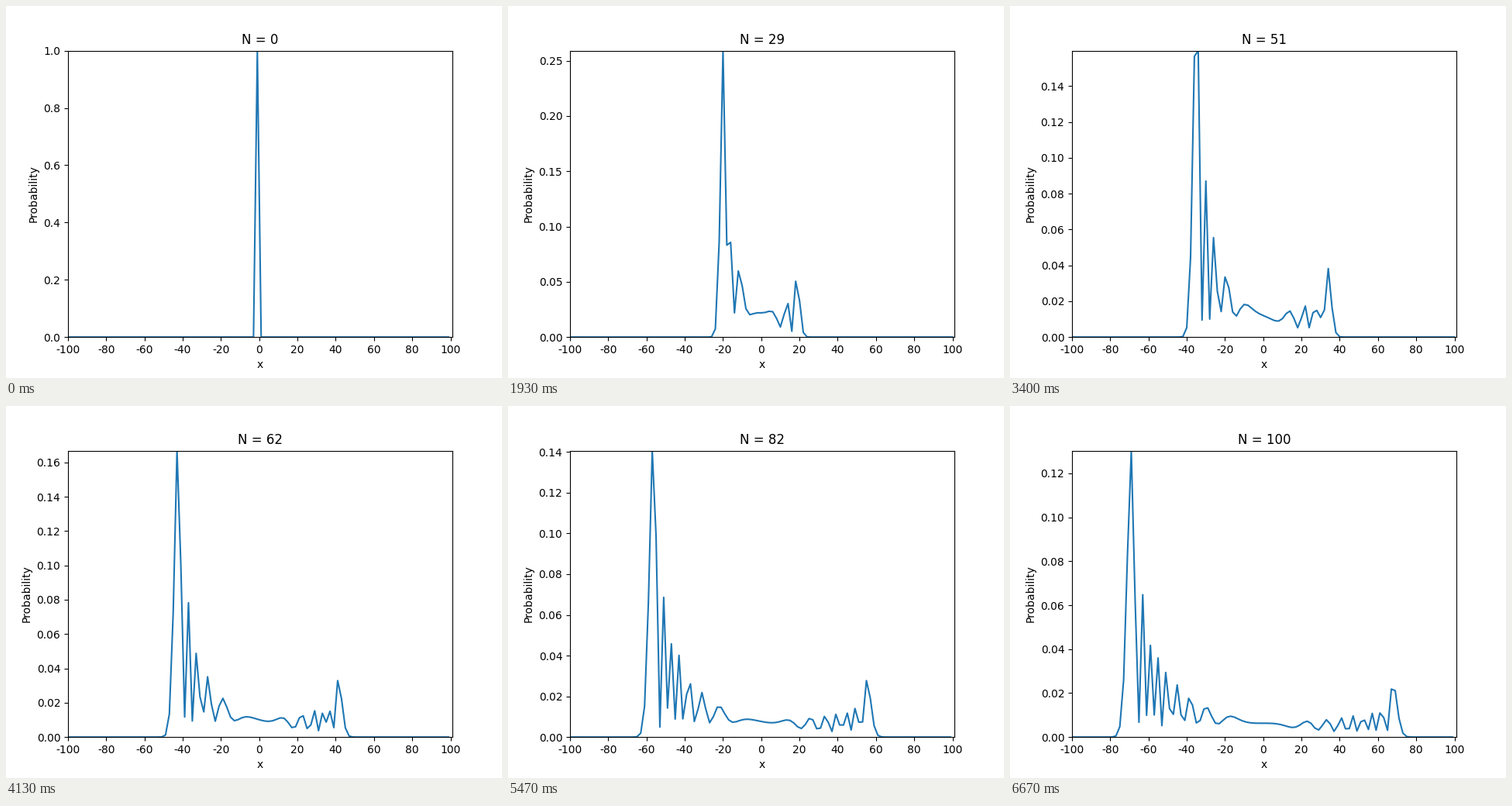
Write a matplotlib script that moves like this. It is 640 px wide and 480 px high and loops after 6740 ms.

```python
import numpy as np
import matplotlib.pyplot as plt
from matplotlib.animation import FuncAnimation

STEPS = 100
LOOP_MS = 6740
TICKS = 3  # animation ticks per walk step
FRAMES = TICKS * (STEPS + 1)
SITES = 2 * STEPS + 2
START = STEPS


def hadamard_walk(steps):
    """Probability of each site after 0..steps steps of a Hadamard walk."""
    left, right = np.zeros(SITES), np.zeros(SITES)
    left[START] = 1.0
    history = [left**2 + right**2]
    for _ in range(steps):
        to_left = (left + right) / np.sqrt(2)
        to_right = (left - right) / np.sqrt(2)
        left, right = np.roll(to_left, -1), np.roll(to_right, 1)
        history.append(left**2 + right**2)
    return history


x = np.arange(SITES) - STEPS - 1
probs = hadamard_walk(STEPS)

plt.rcParams["font.family"] = "DejaVu Sans"
plt.rcParams["axes.unicode_minus"] = False
fig, ax = plt.subplots(figsize=(6.4, 4.8), dpi=100)
line, = ax.plot([], [], color="#1f77b4", lw=1.5)
title = ax.set_title("N = 0")
ax.set_xlabel("x")
ax.set_ylabel("Probability")
ax.set_xlim(-STEPS, STEPS + 1)
ax.set_xticks(range(-STEPS, STEPS + 1, 20))


def update(tick):
    # The nearest step is shown, so each change lands just ahead of its time.
    n = min(round(tick / TICKS), STEPS)
    # Only sites with the parity of n can be occupied.
    sites = slice(n % 2, None, 2)
    line.set_data(x[sites], probs[n][sites])
    ax.set_ylim(0, probs[n].max())
    title.set_text(f"N = {n}")
    return line, title


anim = FuncAnimation(fig, update, frames=FRAMES, interval=LOOP_MS / FRAMES,
                     repeat=True, repeat_delay=0, blit=False)
plt.show()
```
